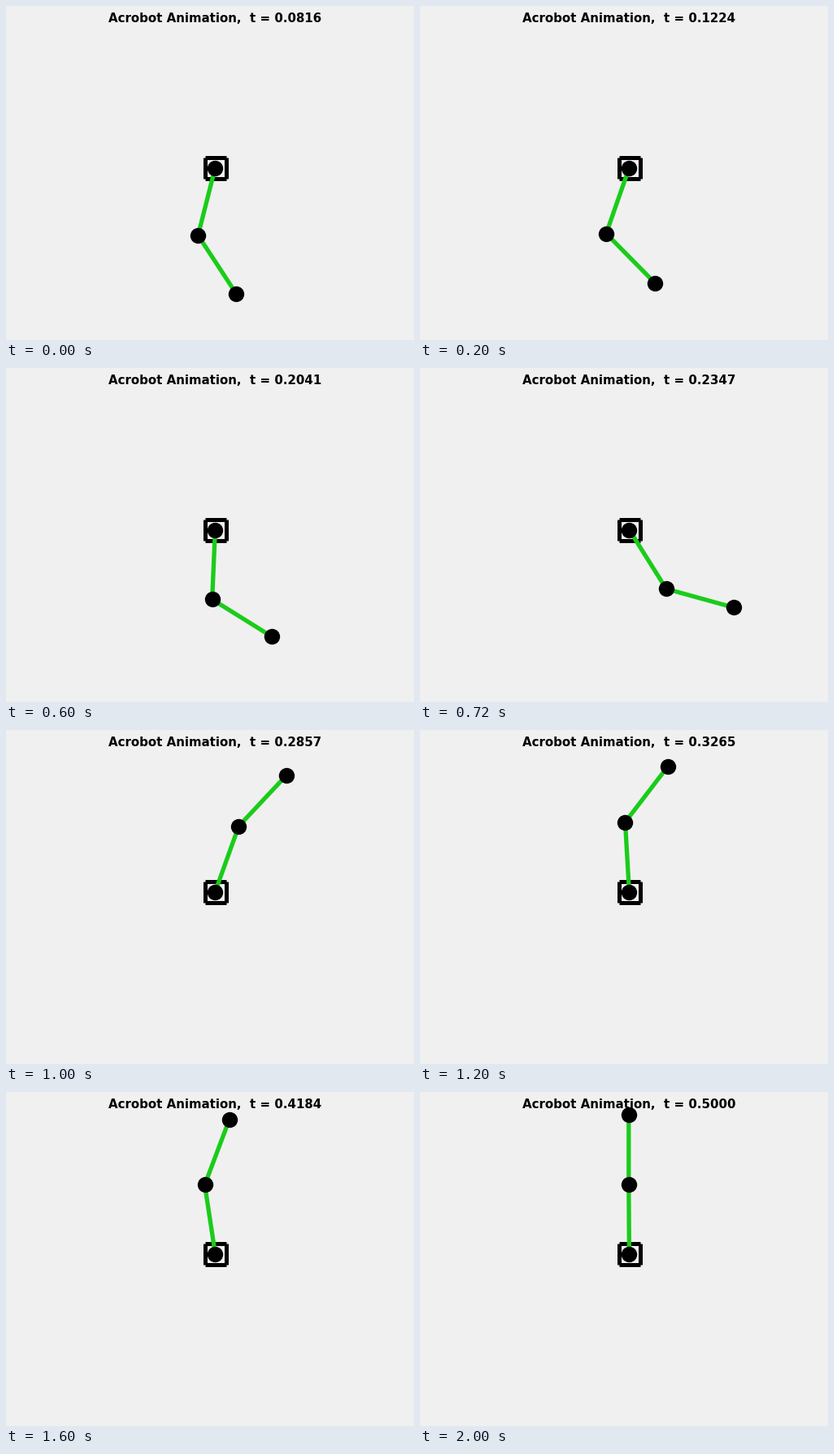
Animation, 502 px wide and 412 px high, one loop 4.4 s. Source, as a matplotlib script:

```python
import numpy as np
import matplotlib.pyplot as plt
from matplotlib.animation import FuncAnimation

W, H, DPI = 502, 412, 64
PX = 72 / DPI               # points per pixel
STEP, LOOP = 40, 4400       # ms
FPS = 15
PIVOT = np.array([257.4, 199.5])
LINK = 86.0
BG, GREEN = "#f0f0f0", (0.1, 0.8, 0.1)

# Link angles in degrees, 0 pointing down, at samples of the 50-point solution
Q1 = np.array([(8, -14.2), (12.5, -19.4), (16, -17), (20, -2.5), (23, 32),
               (26, 112), (28, 160.3), (32, 183.3), (37, 192), (41, 188.6),
               (45, 185), (49, 180.4)])
Q2 = np.array([(8, 33.1), (16, 53.9), (20, 58), (23, 74.5), (26, 112),
               (28, 136.9), (30, 141.8), (32, 142.6), (41, 159.4), (49, 180)])

# Solution sample reached at each drawn step
PACE = np.array([(0, 8), (6, 16), (11, 23), (15, 28), (18, 32), (24, 41), (30, 49)])
HELD = (22, 29)             # steps that repeat the one before


def hermite(knots, x):
    t, q = knots.T
    m = np.gradient(q, t)
    i = int(np.clip(np.searchsorted(t, x, side="right") - 1, 0, len(t) - 2))
    h = t[i + 1] - t[i]
    s = (x - t[i]) / h
    return ((1 + 2 * s) * (1 - s) ** 2 * q[i] + s * (1 - s) ** 2 * h * m[i]
            + s * s * (3 - 2 * s) * q[i + 1] + s * s * (s - 1) * h * m[i + 1])


def sample(frame):
    starts = np.round(np.arange(31) * 1000 / FPS / STEP)
    n = int(np.searchsorted(starts, frame, side="right")) - 1
    if n in HELD:
        n -= 1
    return int(round(float(np.interp(n, PACE[:, 0], PACE[:, 1]))))


def link(angle):
    a = np.radians(angle)
    return LINK * np.array([np.sin(a), np.cos(a)])


fig = plt.figure(figsize=(W / DPI, H / DPI), dpi=DPI, facecolor=BG)
ax = fig.add_axes([0, 0, 1, 1])
ax.set_xlim(0, W)
ax.set_ylim(H, 0)
ax.axis("off")

# Base: four separate bars, so the outer corners stay notched
x0, x1, y0, y1 = 244.5, 270.5, 186.5, 212.5
for xs, ys in (((x0, x1), (y0, y0)), ((x0, x1), (y1, y1)),
               ((x0, x0), (y0, y1)), ((x1, x1), (y0, y1))):
    ax.plot(xs, ys, color="black", lw=5 * PX, solid_capstyle="butt", zorder=1)

arm, = ax.plot([], [], color=GREEN, lw=5.3 * PX, solid_capstyle="butt",
               solid_joinstyle="round", zorder=2)
joints, = ax.plot([], [], "o", color="black", ms=19.4 * PX, mew=0, zorder=3)
title = ax.text(126, 20, "", family="DejaVu Sans", weight="bold",
                size=15 * PX, ha="left", va="baseline", zorder=4)


def draw(frame):
    k = sample(frame)
    elbow = PIVOT + link(hermite(Q1, k))
    tip = elbow + link(hermite(Q2, k))
    xs, ys = np.array([PIVOT, elbow, tip]).T
    arm.set_data(xs, ys)
    joints.set_data(xs, ys)
    title.set_text(f"Acrobot Animation,  t = {k * 0.5 / 49:.4f}")
    return arm, joints, title


anim = FuncAnimation(fig, draw, frames=LOOP // STEP, interval=STEP,
                     init_func=lambda: draw(0), repeat=True, repeat_delay=0)
plt.show()
```
